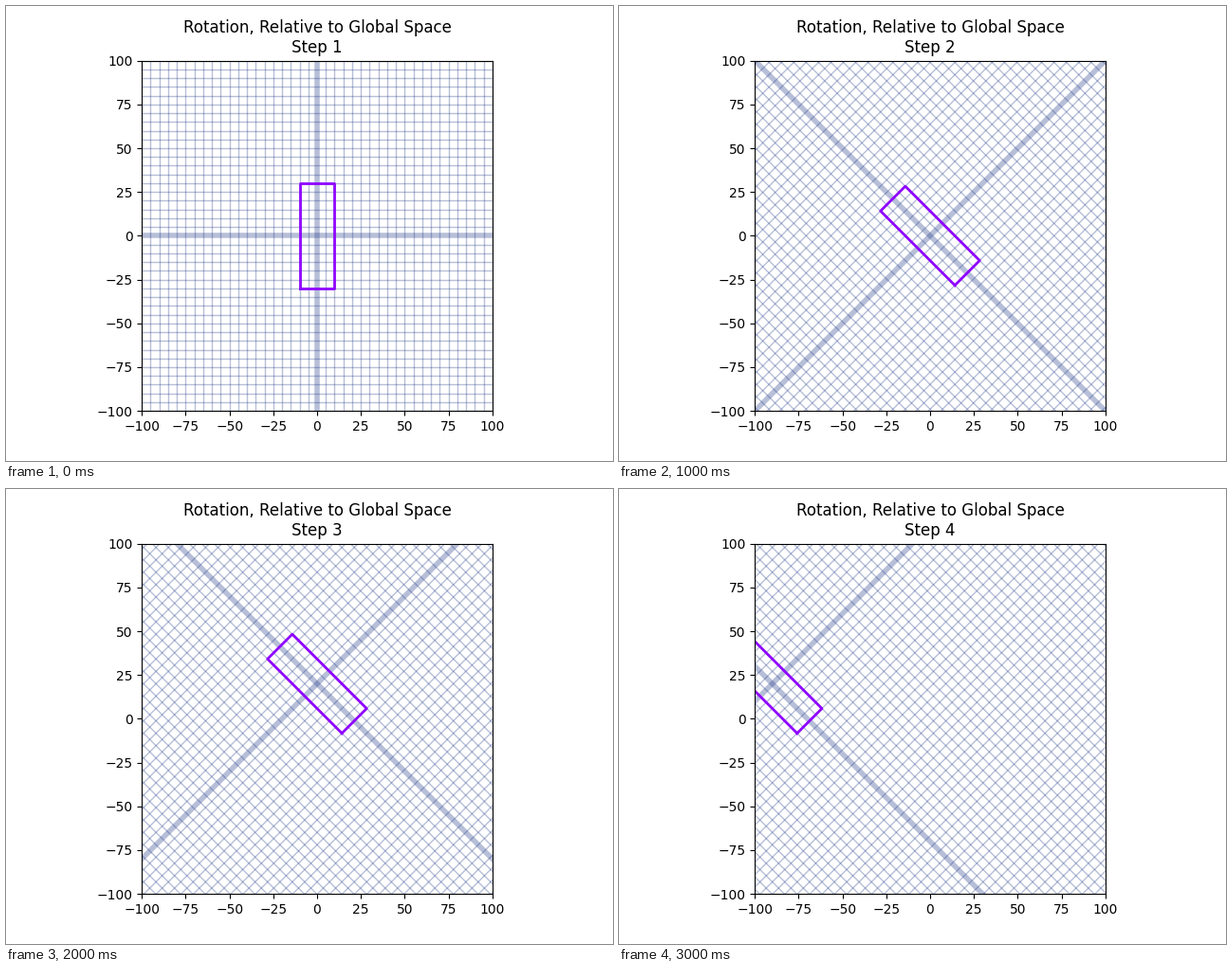
These frames come from a looping animation (640 by 480 pixels, 4 s). A matplotlib script:

```python
import numpy as np
import matplotlib.pyplot as plt
from matplotlib.animation import FuncAnimation

GRID_COLOR = "#122d80"
BOX_COLOR = "#8f00ff"
REACH, SPACING = 300, 5

# Pose at each step: angle in degrees, then centre x and y
POSES = [(0, 0, 0), (45, 0, 0), (45, 0, 20), (45, -90, 20)]

fig, ax = plt.subplots(figsize=(6.4, 4.8), dpi=100)
ax.set_aspect("equal")
ax.set_xlim(-100, 100)
ax.set_ylim(-100, 100)
title = ax.set_title("")


def transform(points, angle, x, y):
    """Rotate 2 x N points about the origin, then shift them."""
    c, s = np.cos(np.radians(angle)), np.sin(np.radians(angle))
    return np.array([[c, -s], [s, c]]) @ points + np.array([[x], [y]])


def add_shape(points, **style):
    line, = ax.plot([], [], **style)
    shapes.append((line, np.array(points, dtype=float)))


shapes = []
for offset in range(-REACH, REACH + 1, SPACING):
    width = 4 if offset == 0 else 1
    ends, level = [-REACH, REACH], [offset, offset]
    for points in ([level, ends], [ends, level]):
        add_shape(points, color=GRID_COLOR, alpha=0.3, lw=width)
add_shape([[-10, 10, 10, -10, -10], [-30, -30, 30, 30, -30]],
          color=BOX_COLOR, lw=2)


def update(step):
    for line, points in shapes:
        line.set_data(*transform(points, *POSES[step]))
    title.set_text(f"Rotation, Relative to Global Space\nStep {step + 1}")
    return [title] + [line for line, _ in shapes]


anim = FuncAnimation(fig, update, frames=len(POSES), interval=1000,
                     repeat=True, repeat_delay=0)
plt.show()
```
